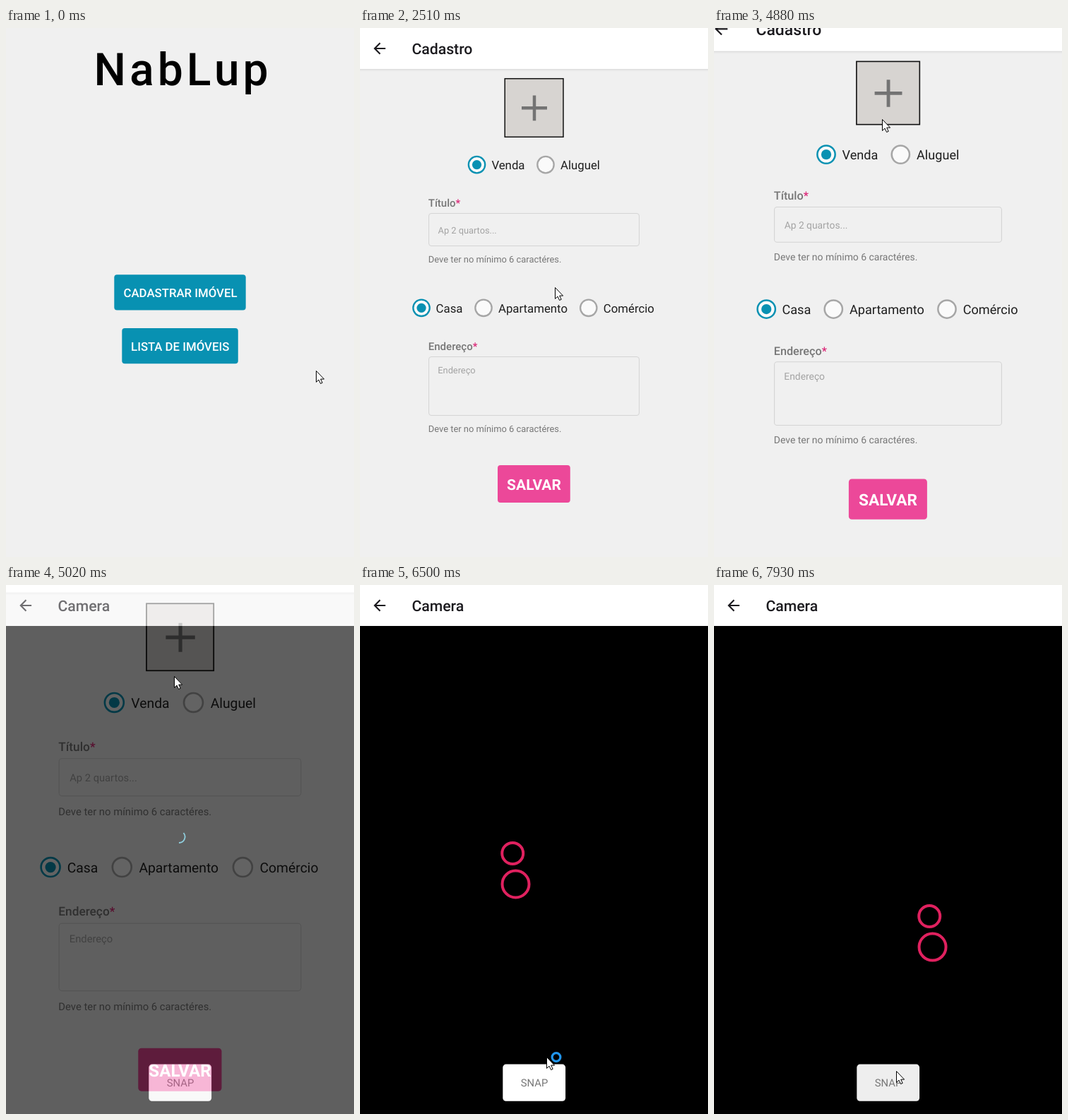
An HTML page for the animation above (7.99 s loop, 493x749 px).

```html
<!DOCTYPE html>
<html lang="pt">
<head>
<meta charset="utf-8">
<title>NabLup</title>
<style>
  html, body { margin: 0; width: 100%; height: 100%; overflow: hidden; background: #f0f0f0; }
  svg { display: block; width: 493px; height: 749px; }
  text { font-family: Roboto, Arial, sans-serif; font-size: 16.8px; fill: #1f1f1f; text-rendering: geometricPrecision; }
  .mid { text-anchor: middle; }
  .brand { font-size: 64px; font-weight: 500; letter-spacing: 5px; fill: #000; }
  .btn { font-weight: 500; fill: #fff; }
  .head { font-size: 21.2px; font-weight: 500; fill: #1c1b1f; }
  .label { font-size: 15px; font-weight: 500; fill: #777; }
  .label tspan { fill: #db2777; }
  .hint { font-size: 12.9px; fill: #777; }
  .ghost { font-size: 12.8px; fill: #a3a3a3; }
  .save { font-size: 21px; font-weight: 700; fill: #fff; }
  .snap { font-size: 14.8px; fill: #777; }
  .field { fill: none; stroke: #d4d4d4; }
  .ring { fill: none; stroke: #e0215f; stroke-width: 4; }
</style>
</head>
<body>
<svg viewBox="0 0 493 749">
  <defs>
    <path id="back" transform="translate(15.1 16.4) scale(1.05)" fill="#1c1b1f"
      d="M20 11H7.83l5.59-5.59L12 4l-8 8 8 8 1.41-1.41L7.83 13H20z"/>
    <circle id="off" r="11.7" fill="#fafafa" stroke="#a6a6a6" stroke-width="2.3"/>
    <g id="on">
      <circle r="11.7" fill="#fafafa" stroke="#0891b2" stroke-width="2.3"/>
      <circle r="6.6" fill="#0891b2"/>
    </g>
  </defs>
  <rect width="493" height="749" fill="#f0f0f0"/>

  <g id="home">
    <rect width="493" height="749" fill="#f0f0f0"/>
    <text class="brand mid" x="250.5" y="81">NabLup</text>
    <rect id="addBtn" x="153.3" y="349.2" width="186.4" height="50.3" rx="4"/>
    <text class="btn mid" x="247" y="381.4">CADASTRAR IMÓVEL</text>
    <rect x="164.3" y="425" width="164.5" height="50.3" rx="4" fill="#0891b2"/>
    <text class="btn mid" x="246.7" y="457.1">LISTA DE IMÓVEIS</text>
  </g>

  <g id="form">
    <rect width="493" height="749" fill="#f0f0f0"/>
    <rect y="58" width="493" height="1.5" fill="#dcdcdc"/>
    <rect y="59.5" width="493" height="1.5" fill="#e9e9e9"/>
    <rect width="493" height="58" fill="#fff"/>
    <use href="#back"/>
    <text class="head" x="73.4" y="36.7">Cadastro</text>
    <rect x="205.2" y="71.7" width="82.8" height="82.6" fill="#d7d4d1" stroke="#111" stroke-width="1.5"/>
    <path d="M229 113.3H265M247 95.5V131.2" stroke="#737373" stroke-width="4.5"/>
    <use href="#on" x="165.5" y="193.6"/><text x="186.4" y="200.4">Venda</text>
    <use href="#off" x="263" y="193.6"/><text x="284" y="200.4">Aluguel</text>
    <text class="label" x="96.8" y="253">Título<tspan>*</tspan></text>
    <rect class="field" x="97.5" y="262.5" width="298" height="46" rx="3.5"/>
    <text class="ghost" x="110.6" y="291">Ap 2 quartos...</text>
    <text class="hint" x="96.8" y="332">Deve ter no mínimo 6 caractéres.</text>
    <use href="#on" x="87" y="396.3"/><text x="107.6" y="403">Casa</text>
    <use href="#off" x="175" y="396.3"/><text x="196" y="403">Apartamento</text>
    <use href="#off" x="323.8" y="396.3"/><text x="344.8" y="403">Comércio</text>
    <text class="label" x="96.8" y="456">Endereço<tspan>*</tspan></text>
    <rect class="field" x="97.5" y="465.5" width="298" height="83" rx="3.5"/>
    <text class="ghost" x="110.3" y="489">Endereço</text>
    <text class="hint" x="96.8" y="572">Deve ter no mínimo 6 caractéres.</text>
    <rect x="195" y="619" width="102.8" height="53" rx="4" fill="#ec4899"/>
    <text class="save mid" x="246.5" y="653.8">SALVAR</text>
  </g>

  <g id="camera">
    <rect width="493" height="749"/>
    <rect width="493" height="58" fill="#fff"/>
    <use href="#back"/>
    <text class="head" x="73.4" y="36.7">Camera</text>
    <path id="spinner" d="M251.5 351A8.5 8.5 0 0 1 245 365" fill="none" stroke="#4fb9d2" stroke-width="1.8"/>
    <g id="rings">
      <circle class="ring" cx="17.2" cy="17.2" r="15"/>
      <circle class="ring" cx="21.5" cy="60.7" r="19"/>
    </g>
    <rect id="snapBtn" x="202.3" y="678.6" width="88.8" height="52.2" rx="4.5"/>
    <text class="snap mid" x="247" y="710">SNAP</text>
  </g>

  <circle id="tap" r="12" fill="#ff0" fill-opacity=".47"/>
  <g id="cursor">
    <path d="M.5 .5V16.4L4 13.1 6.6 18.5 9.2 17.3 6.7 12.1H11.6Z" fill="#fff" stroke="#000"/>
    <circle id="busy" cx="14" cy=".5" r="5.9" fill="none" stroke="#2196ec" stroke-width="3.2"/>
  </g>
</svg>
<script>
const LOOP = 7990, TICK = 70, TAP = 150;
const ADD_TAP = 1440, PHOTO_TAP = 4540, SNAP_TAP = 7510;
const CAMERA_READY = 5150, RINGS_START = 5340, RING_STEP = 193;

// Pointer moves between rests; bow bends the path sideways
const home = { x: 439, y: 485 };
const moves = [
  { from: 330, to: 1040, x: 276, y: 367, bow: 16 },
  { from: 2760, to: 3390, x: 259, y: 222, bow: -14 },
  { from: 3660, to: 3930, x: 213, y: 286, bow: 0 },
  { from: 4130, to: 4480, x: 238, y: 129, bow: 0 },
  { from: 5670, to: 6500, x: 264, y: 668, bow: 24 },
  { from: 6500, to: 6910, x: 258, y: 688, bow: 0 }
];

const $ = id => document.getElementById(id);
const clamp = (v, lo = 0, hi = 1) => Math.min(hi, Math.max(lo, v));
const within = (t, start, span) => t >= start && t < start + span;
const show = (id, on) => { $(id).style.display = on ? '' : 'none'; };
const move = (id, x, y) => $(id).setAttribute('transform', `translate(${x} ${y})`);
const fill = (id, color) => $(id).setAttribute('fill', color);

function pointer(t) {
  let { x, y } = home;
  for (const m of moves) {
    const k = clamp((t - m.from) / (m.to - m.from));
    const eased = (1 - Math.cos(Math.PI * k)) / 2;
    x += (m.x - x) * eased + m.bow * Math.sin(Math.PI * eased);
    y += (m.y - y) * eased;
  }
  return [Math.round(x), Math.round(y)];
}

// The old screen grows about the centre while the new one fades in
function change(t, start, end, from, to) {
  const p = clamp(Math.floor((t - start) / TICK) / 3);
  const scale = 1 + .15 * p ** .57;
  const alpha = t >= end ? 1 : clamp(.9 * (p - 1 / 3));
  $(from).setAttribute('transform', `translate(246.5 374.5) scale(${scale}) translate(-246.5 -374.5)`);
  $(to).setAttribute('opacity', alpha);
  show(to, alpha > 0);
  if (alpha === 1) show(from, false);
}

function draw(t) {
  show('home', true);
  change(t, 2300, 2510, 'home', 'form');
  change(t, 4810, CAMERA_READY, 'form', 'camera');

  fill('addBtn', t < ADD_TAP + TAP ? '#0891b2' : '#175f78');
  fill('snapBtn', t < SNAP_TAP + TAP ? '#fff' : '#eee');
  show('spinner', t < CAMERA_READY);

  // The pattern drifts diagonally in steps, slowing a little
  const step = Math.floor((t - RINGS_START) / RING_STEP);
  const shift = 15.57 * step - .15 * step ** 2;
  show('rings', step >= 0);
  move('rings', 111 + shift, 274.8 + shift);

  const [x, y] = pointer(t);
  move('cursor', x, y);
  move('tap', x, y);
  show('tap', [ADD_TAP, PHOTO_TAP, SNAP_TAP].some(start => within(t, start, TAP)));
  show('busy', within(t, 6430, 2 * TICK));
}

const start = performance.now();
function tick() {
  draw((performance.now() - start) % LOOP);
  requestAnimationFrame(tick);
}
tick();
</script>
</body>
</html>
```
